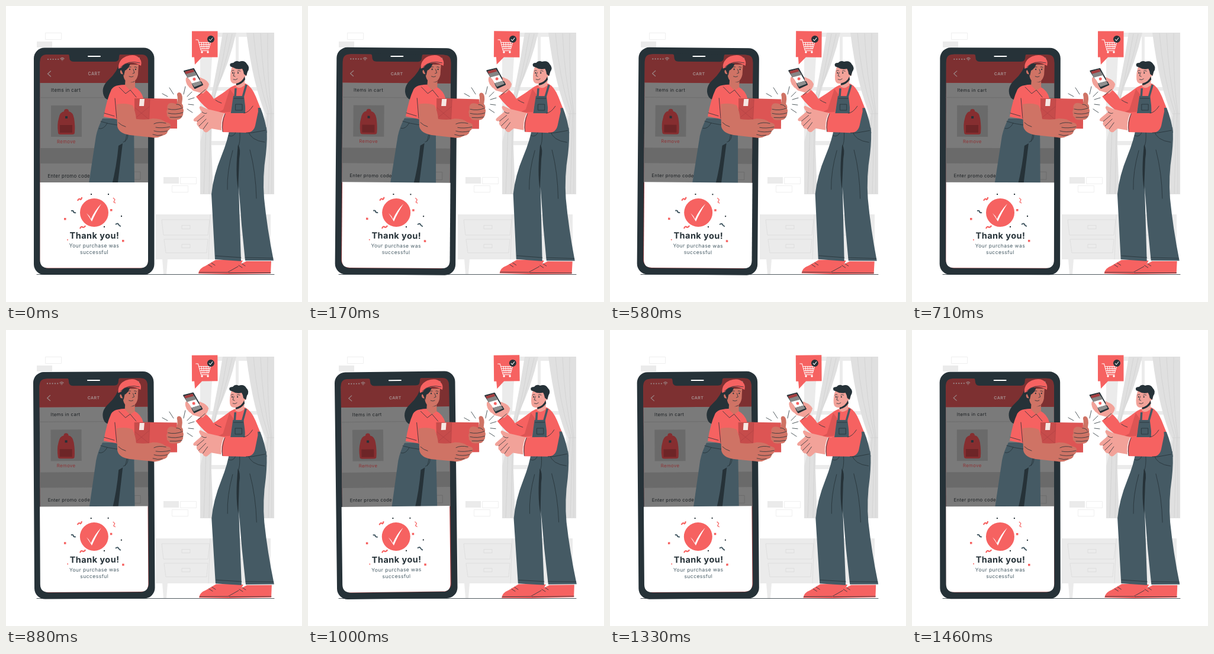
An HTML page that plays this animation: 500x500 px, repeating every 1.5 s.

```html
<!DOCTYPE html>
<html lang="en">
<head>
<meta charset="utf-8">
<title>Thank you</title>
<style>
html, body { margin: 0; width: 100%; height: 100%; overflow: hidden; background: #fff; }
svg { display: block; width: 100vw; height: 100vh; }
text { font-family: Inter, sans-serif; }
.red { fill: #f66261; }
.deep { fill: #dd5554; }
.dark { fill: #263238; }
.denim { fill: #455a64; }
.tan { fill: #cf7365; }
.pink { fill: #f2a299; }
.pale { fill: #ebebeb; }
.white { fill: #fff; }
.line { fill: none; stroke: #263238; stroke-width: .8; stroke-linecap: round; stroke-linejoin: round; }
.grey { fill: none; stroke: #d9d9d9; stroke-width: .7; }
.brick { fill: none; stroke: #ebebeb; stroke-width: .8; }
.mark { fill: none; stroke: #fff; stroke-width: 1; }
</style>
</head>
<body>
<svg viewBox="0 0 500 500">
  <!-- room -->
  <path class="pale" d="M52 60h26v10H52zM266 289h26v11h-26z"/>
  <path class="brick" d="M66.500 45.500h27v11h-27zM294.500 289.500h27v11h-27zM280.500 303.500h27v11h-27z"/>
  <path class="pale" d="M328 45H453V318H328z"/>
  <path class="white" d="M350 52H388V137H345zM393 52H410L424 137H393zM342 143H388V228H342zM393 143H425L436 180V228H393zM342 235H434V306H342z"/>
  <path fill="#e0e0e0" d="M366 45H389Q377 97 356 140Q347 184 347 235L350 318H328V230Q352 140 366 45zM406 45H453V318H424Q426 240 440 184Q418 140 406 45z"/>
  <path class="grey" style="stroke:#cfcfcf" d="M374 47Q360 130 338 205L334 317M382 47Q368 112 346 172L343 317M418 46Q424 120 443 178L434 317M430 46Q433 120 447 180L443 317M442 46Q441 130 449 180V317M440 182h13"/>
  <path class="pale" d="M253 352H447V428H253zM264 428h9l-2 25h-5z"/>
  <path class="grey" d="M345 352l-3 76M263 361h81l-3 26h-75zM267 394h74l-2 23h-69zM297 370.500h14v6h-14zM297 402.500h14v6h-14zM362 361h78v26h-78z"/>
  <path class="line" d="M52 453.500H453"/>

  <g data-pivot="149 262">
    <rect class="dark" x="47" y="70.500" width="203.500" height="383.500" rx="18"/>
    <rect fill="#a33c3e" x="57.500" y="82" width="182.500" height="361" rx="14"/>
    <path fill="#7a7a7a" d="M57.500 130H240V299H57.500z"/>
    <path fill="#7d3031" d="M57.500 130V94Q57.500 82 69 82H229Q240 82 240 94V130z"/>
    <path fill="#717171" d="M57.500 154H240v1.500H57.500z"/>
    <path fill="#6a6a6a" d="M57.500 240H240v26H57.500zM76 168h52v53H76z"/>
    <path class="dark" d="M103 81q4 0 4 5 0 8 7 8h70q7 0 7-8 0-5 4-5z"/>
    <path d="M139 85h20" stroke="#fff" stroke-width="2" stroke-linecap="round"/>
    <g fill="none" stroke="#9a8686" stroke-linecap="round">
      <path d="M71 90h18" stroke-width="2.200" stroke-dasharray="0 4.300"/>
      <path d="M92 89q3-3 6 0M93.500 90.500q1.500-1.500 3 0M95 92v.2M75.500 110l-5 4.500 5 4.500" stroke-width="1.200"/>
    </g>
    <rect x="217" y="87" width="9" height="5" rx="1" fill="#9a8686"/>
    <text x="149" y="117" text-anchor="middle" font-size="7" font-weight="600" letter-spacing=".4" fill="#a89292">CART</text>
    <g font-size="7.800" fill="#1c2023" letter-spacing=".35">
      <text x="76" y="145">Items in cart</text>
      <text x="70.500" y="289.500">Enter promo code</text>
      <text x="86" y="231.500" fill="#8f3436">Remove</text>
    </g>
    <path d="M205 280h22v13h-22z" fill="none" stroke="#666" stroke-width=".7"/>
    <path fill="#862e30" d="M88 214Q86 200 89 190Q91 179 98 178Q98 174 102 174Q106 174 106 178Q113 179 115 190Q117 203 116 214Q116 217 112 217H92Q88 217 88 214z"/>
    <path fill="#6d2527" d="M91 201h21v13H91z"/>
    <path class="dark" d="M100 186h4v4h-4z"/>
  </g>

  <g data-pivot="221 190">
    <path class="dark" d="M194 91Q188 112 173 125Q160 137 165 151Q169 163 188 157Q211 149 209 119z"/>
    <path class="denim" d="M163 190Q155 205 152 220L139 306H217L216 190z"/>
    <path class="dark" d="M190 236Q187 270 178 306H188L197 232z"/>
    <path class="line" d="M157 207q8 2 14-9M206 200q-1 18-5 29M198 230q8-2 8-14M160 195q24 8 55 7"/>
    <path class="red" d="M190 134Q204 131 216 136Q229 143 232 156L218 193Q200 196 186 191L165 187Q170 158 178 141Q182 135 190 134z"/>
    <path class="tan" d="M202 119L201 134L210 143L218 137V121z"/>
    <path class="dark" d="M202 122Q207 132 217 128V124z"/>
    <path class="tan" d="M198 99Q194 103 196 108Q192 108 193 112Q194 116 198 115Q199 128 208 129Q220 130 223 116L224 99z"/>
    <path class="dark" d="M192 103Q200 95 210 98Q206 107 201 109L199 118L196 111z"/>
    <path class="red" d="M190 106Q189 91 203 85Q218 80 225 88Q230 93 228 101Q218 95 209 96Q199 97 195 104z"/>
    <path class="line" d="M194 103Q206 91 226 96M206 104q2-2 5-1M217 103q2-1 4 1M215 107l2 6-3 1M208 119q4 2 7 0M191 137l11 11 8-6 10 12M184 156l3 34M166 181l17 5"/>
    <path class="dark" d="M208 107a1 1.300 0 1 0 2 0 1 1.300 0 1 0-2 0M218 107a1 1.300 0 1 0 2 0 1 1.300 0 1 0-2 0"/>
    <path class="deep" d="M217 156H243L289 157V207H242L217 198z"/>
    <path fill="#c64c4b" d="M217 156H243L241 206L217 198z"/>
    <path class="line" style="stroke:#a93d40;stroke-width:.5" d="M243 157l-2 49M218 172l24 20M218 190l24-20"/>
    <path fill="#f6e7e3" d="M226 157h8l-1 12h-8z"/>
    <path class="dark" d="M261 198h5l-2 3v3h-2zM267 197h4v3l-1 4h-2z"/>
    <path class="tan" d="M187 166Q203 163 214 168Q219 179 220 191Q237 193 248 190Q263 190 269 196Q280 198 278 203Q278 208 273 211Q273 217 264 219Q255 224 246 222L209 218Q190 215 188 203z"/>
    <path class="line" d="M250 199q8-4 20-1M253 205q10 2 24-1M250 211q10 3 23 0M248 217q8 3 16 1M190 197q5 5 12 7"/>
    <path class="tan" d="M288 166Q291 157 289 150Q289 146 293 146Q298 147 298 157L297 165Q300 168 299 173Q301 177 299 180Q300 184 297 187Q295 193 286 192Q275 193 275 188Q271 187 272 182Q270 178 273 174Q271 169 275 165Q280 162 288 166z"/>
    <path class="line" d="M274 174q12 3 24-2M274 181q12 3 25-1M277 188q10 1 20-1M288 166q6 0 8 4"/>
  </g>

  <path class="line" data-pivot="292 158" d="M264 148l9 5M276 138l7 11M303 136l-3 13M314 145l-8 8M318 155l-10 3M308 166l9 1M306 174l9 6"/>

  <g data-pivot="149 370">
    <path class="white" d="M57.500 298H240V429Q240 442.500 227 442.500H71Q57.500 442.500 57.500 429z"/>
    <circle class="red" cx="149" cy="349" r="24"/>
    <path class="white" d="M136 350Q141 354 143.500 360Q150 345 161 334Q151 350 145 364Q141 357 136 350z"/>
    <path d="M121 329q2-5 5-2 2-1 2-4M125 376q2-5 5-2 3 0 4-3" fill="none" stroke="#f66261" stroke-width="2.200"/>
    <path d="M110 346q4-1 4 2 2 2 4 1M185 369q4-3 5 0 2 3 4 3" fill="none" stroke="#455a64" stroke-width="2"/>
    <path d="M181 324l3 3-2 4 3 2" fill="none" stroke="#f66261" stroke-width="1.200"/>
    <path class="red" d="M98 358h3.500v3.500H98zM176 343h3.500v3.500H176zM196 395h3.500v3.500H196z"/>
    <circle class="red" cx="104" cy="395" r="1"/>
    <path class="dark" d="M143 317h2v2h-2zM172 317h2v2h-2zM165 372h2v2h-2zM194 354h2v2h-2z"/>
    <g text-anchor="middle" class="dark">
      <text x="149.500" y="393" font-size="14.500" font-weight="700" letter-spacing=".45">Thank you!</text>
      <g font-size="8.500" letter-spacing=".45" style="fill:#455a64">
        <text x="149" y="408">Your purchase was</text>
        <text x="149" y="419">successful</text>
      </g>
    </g>
  </g>

  <g data-pivot="386 271">
    <path class="red" d="M325 452Q326 443 337 439L354 429H378L400 430L394 441L375 453zM375 453Q377 444 389 440L406 431H448L447 452z"/>
    <path class="line" d="M326 450H374L392 440M376 450.500H447M342 437l6 4M347 434l6 4M393 438l6 4M398 435l6 4"/>
    <path class="red" d="M380 137Q392 130 405 131Q415 136 422 153L430 173L434 206L378 213L376 181L352 182Q334 171 321 153L337 141Q346 148 351 157Q367 147 380 137z"/>
    <path class="deep" d="M378 140L367 175L357 180L379 179L386 151z"/>
    <path class="denim" d="M384 152H402L406 186H379zM420 172L430 172Q438 192 441 214H412z"/>
    <path d="M387 154L388 139M400 154L406 133" fill="none" stroke="#455a64" stroke-width="3.500"/>
    <path class="denim" d="M378 205H440Q442 222 439 250Q433 288 436 325Q441 375 452 430H404L398 370L393 305L397 431L353 428L347 318Q350 287 364 253Q375 226 378 205z"/>
    <path class="dark" d="M392 234Q397 241 394 258L392 310Q387 280 392 234z"/>
    <path class="line" d="M354 422l43 3M404 425l47 1M376 219q10 4 13-9M409 211q4 16 28 19M395 212q1 20-3 26M383 244q-10 36-9 66M412 243q10 38 11 82"/>
    <path class="pink" d="M316 143L306 133Q300 120 309 119L331 122Q340 125 343 132Q342 140 333 148z"/>
    <path class="red" d="M405 151Q414 141 420 151Q426 162 426 178L421 202Q418 214 406 214L366 213Q362 197 370 181L404 181z"/>
    <path class="line" d="M385 156h16M388 166h11v10h-11zM402 181q8-1 15-12M370 182q-6 15-4 30M406 214h10l22-4M325 151l12-10M354 159q4 3 10 5"/>
    <path class="pink" d="M369 181L340 174Q333 171 329 169Q325 170 328 175L331 179L318 190Q315 194 319 195L323 195Q321 201 325 203Q327 209 332 208Q335 215 340 213L347 207L364 210Q362 194 369 181z"/>
    <path class="line" d="M331 179q5 4 8 2M323 195l12-10M326 203l12-12M333 208l8-11"/>
    <path class="pink" d="M389 124L388 135Q393 142 403 134L404 117z"/>
    <path class="dark" d="M389 130Q399 129 403 119L404 124Q399 132 389 134z"/>
    <path class="pink" d="M382 102Q378 113 379 124Q380 132 388 131Q399 129 401 119Q408 119 407 113L404 101z"/>
    <path class="dark" d="M379 102Q376 96 384 96Q388 91 394 94Q403 91 407 98Q413 104 408 111L406 118L402 115Q401 109 399 106Q390 108 384 104z"/>
    <path class="line" d="M381 110q2-2 4-1M391 110q2-2 5 0M386 112l-2 6 3 1M384 124q4 2 7-1"/>
    <path class="dark" d="M382 113a1 1.300 0 1 0 2 0 1 1.300 0 1 0-2 0M391 113a1 1.300 0 1 0 2 0 1 1.300 0 1 0-2 0"/>
    <path class="dark" stroke="#263238" stroke-width="2" stroke-linejoin="round" d="M301 110L317 106L332 133L319 139z"/>
    <path fill="#858585" d="M302 111L316 107L323 117L307 122z"/>
    <path fill="#a33c3e" d="M302 111L316 107L318 111L304 115z"/>
    <path class="white" d="M307 121L322 117L328 127L314 131z"/>
    <path fill="#8f8f8f" d="M314 131L328 127L331 132L318 137z"/>
    <circle class="red" cx="318" cy="123.500" r="2.500"/>
    <path class="pink" d="M304 121q6 1 9 8l3 8q-1 4-6 1-7-8-6-17zM327 120q6 2 5 8l-4-1z"/>
  </g>

  <g data-pivot="336 70">
    <path class="red" d="M314 42.500H357.500V86.500H331L319 99L318 86.500H314z"/>
    <path class="mark" d="M320.500 57h4l5 18.500h13M326 61.500h19.500l-3 11H329M327 65h18M328 68.500h16M330 61l1.500 12M334 61l.5 12M338 61v12M342 61l-1.500 12"/>
    <circle class="white" cx="331" cy="78" r="1.700"/>
    <circle class="white" cx="341" cy="78" r="1.700"/>
    <circle class="dark" cx="346" cy="56" r="6"/>
    <path class="mark" d="M343 56l2.200 2.500 4-5"/>
  </g>
</svg>
<script>
const LOOP = 36, FPS = 24;
const parts = [...document.querySelectorAll('[data-pivot]')];

// Degrees: 0 -> 1 -> -1 -> 0, linear between quarters
const sway = p => p < .25 ? p * 4 : p < .75 ? 2 - p * 4 : p * 4 - 4;

function draw(now) {
  const step = Math.floor(now / 1000 * FPS + .15) % LOOP;
  const angle = sway(step / LOOP);
  for (const part of parts) part.setAttribute('transform', `rotate(${angle} ${part.dataset.pivot})`);
}

const start = performance.now();
function tick() {
  draw(performance.now() - start);
  requestAnimationFrame(tick);
}
tick();
</script>
</body>
</html>
```
